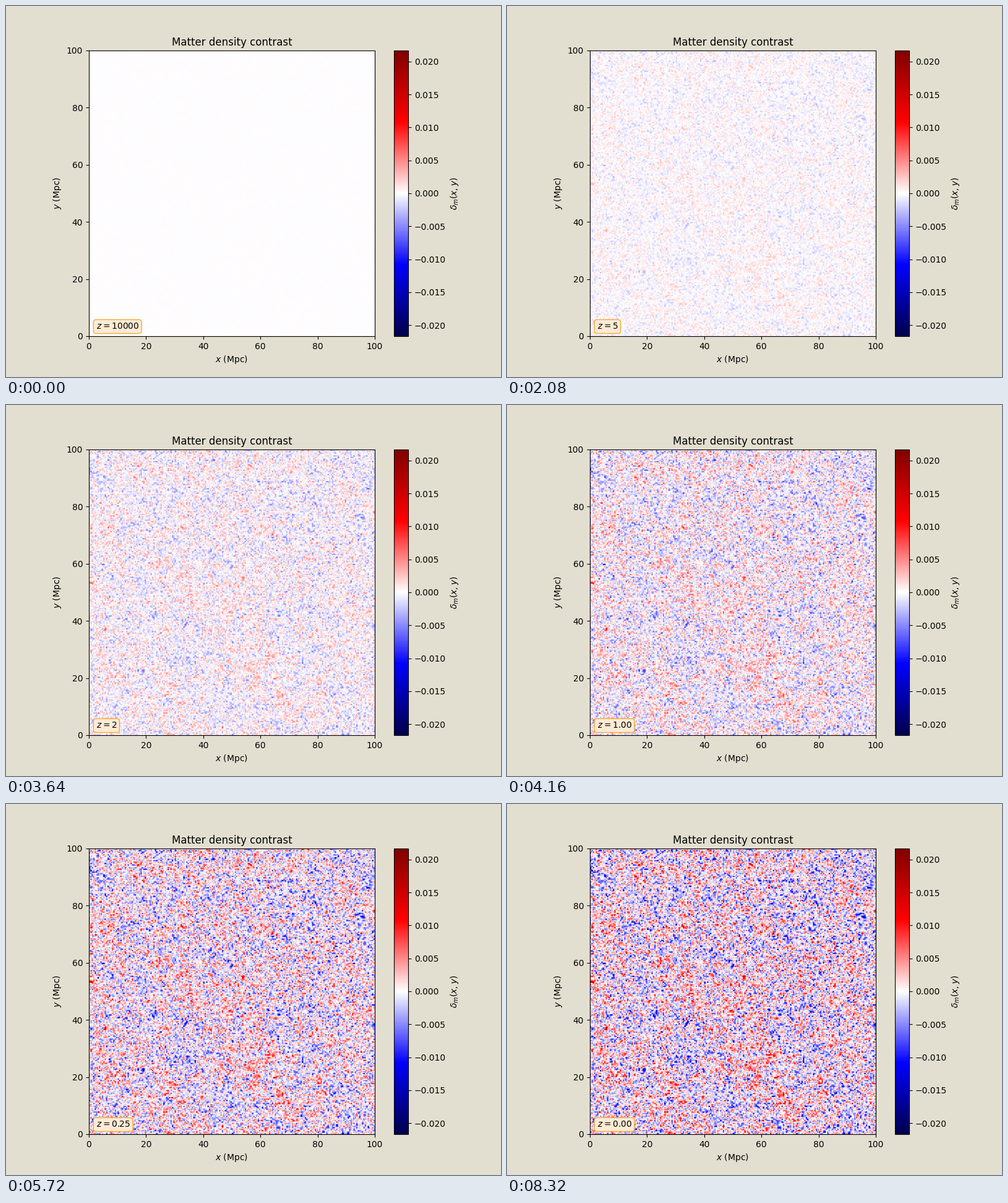
Write a matplotlib script that moves like this. It is 800 px wide and 600 px high and loops after 8.84 s.

```python
import numpy as np
import matplotlib.pyplot as plt
from matplotlib.animation import FuncAnimation

BOX = 100       # side of the slice in Mpc
CELLS = 200
LIMIT = 0.02167
OMEGA_M = 0.31

# Powers of ten, then whole steps, quarters and twentieths down to today
REDSHIFTS = ([10 ** p for p in range(4, 0, -1)]
             + list(range(5, 1, -1))
             + [n / 4 for n in range(4, 0, -1)]
             + [n / 20 for n in range(4, -1, -1)])


def growth(z):
    """Linear growth factor of a flat universe with a cosmological constant."""
    matter = OMEGA_M * (1 + z) ** 3
    om = matter / (matter + 1 - OMEGA_M)
    ol = 1 - om
    g = 2.5 * om / (om ** (4 / 7) - ol + (1 + om / 2) * (1 + ol / 70))
    return g / (1 + z)


def density_today():
    """Gaussian random field: white noise with a mild excess on large scales."""
    rng = np.random.default_rng(12)
    freq = np.fft.fftfreq(CELLS, BOX / CELLS)
    k = np.hypot(freq[:, None], freq[None, :])
    modes = np.fft.fft2(rng.standard_normal((CELLS, CELLS)))
    modes *= 1 + 0.12 / (k + 0.04)
    modes[0, 0] = 0
    field = np.fft.ifft2(modes).real
    return field * LIMIT / np.abs(field).max()


def redshift_label(z):
    return f"$z={z:d}$" if z >= 2 else f"$z={z:.2f}$"


today = density_today()

fig, ax = plt.subplots(figsize=(8, 6), dpi=100, facecolor="#e3dfd0")
image = ax.imshow(today, cmap="seismic", vmin=-LIMIT, vmax=LIMIT,
                  origin="lower", extent=(0, BOX, 0, BOX),
                  interpolation="hanning")
fig.colorbar(image, ax=ax, label=r"$\delta_m(x,y)$")
# A hair left and up, so that centred text rounds to the right pixel
fig.subplots_adjust(left=0.12494, right=0.89994, bottom=0.11008, top=0.88008)
ax.set_title("Matter density contrast")
ax.set_xlabel("$x$ (Mpc)")
ax.set_ylabel("$y$ (Mpc)")
label = ax.text(2.5, 2.5, "", bbox=dict(boxstyle="round,pad=0.3",
                                        fc="#feebd5", ec="#eeae35"))


def update(i):
    z = REDSHIFTS[i]
    image.set_data(today * growth(z) / growth(0))
    label.set_text(redshift_label(z))
    return image, label


anim = FuncAnimation(fig, update, frames=len(REDSHIFTS), interval=520,
                     repeat=True, repeat_delay=0)
plt.show()
```
